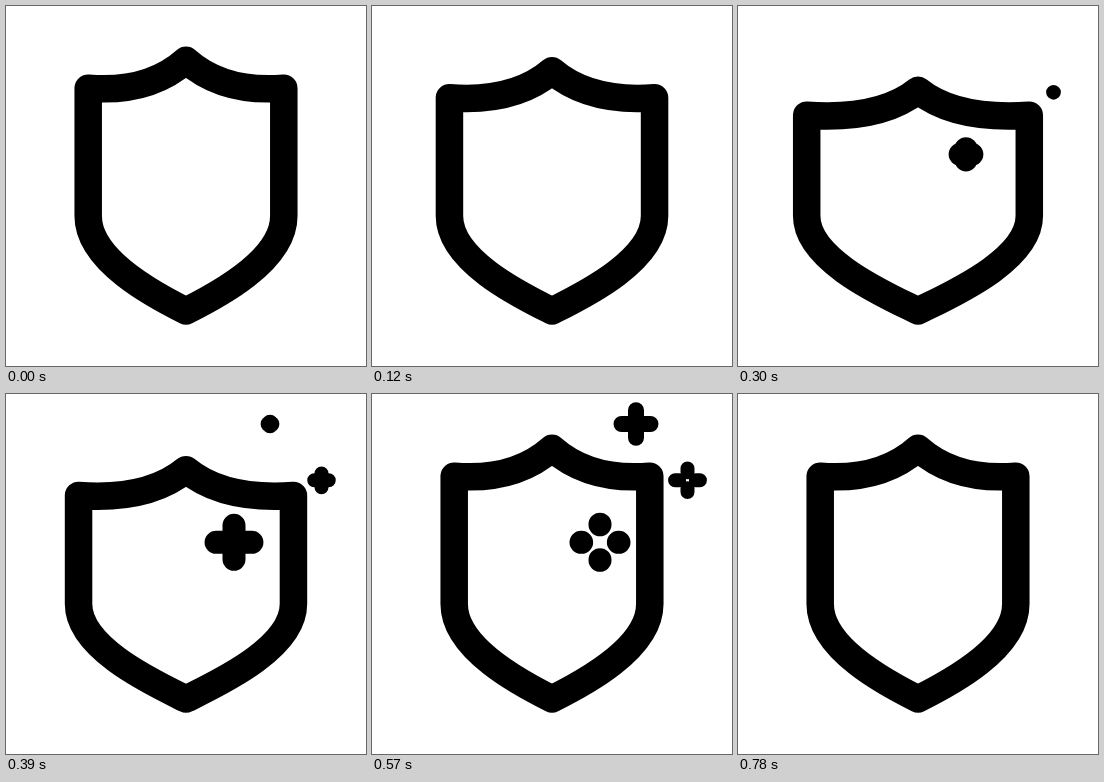
An HTML page that plays this animation: 360 px wide and 360 px high, repeating every 1050 ms.

```html
<!DOCTYPE html>
<html lang="en">
<head>
<meta charset="utf-8">
<title>Shield</title>
<style>
  html, body { margin: 0; height: 100%; overflow: hidden; background: #fff; }
  svg { display: block; width: 100%; height: 100%; }
  path { fill: none; stroke: #000; stroke-linecap: round; stroke-linejoin: round; }
</style>
</head>
<body>
<svg viewBox="0 0 360 360">
  <path id="shield" stroke-width="27.5"/>
</svg>
<script>
const LOOP = 1050, STEP = 30, GROW = 270, TRAIL = 170;
const ARMS = [[1, 0], [-1, 0], [0, .95], [0, -.95]];
const svg = document.querySelector('svg');
const shield = document.getElementById('shield');

const unit = (t, from, to) => Math.min(1, Math.max(0, (t - from) / (to - from)));
const smooth = u => u * u * (3 - 2 * u);
const cubic = u => u < .5 ? 4 * u ** 3 : 1 - 4 * (1 - u) ** 3;

const sparkles = [
  { x: 228, y: 148.3, reach: 19, width: 23, start: 185 },
  { x: 315.5, y: 86.3, reach: 12.4, width: 14, start: 247 },
  { x: 264, y: 30, reach: 14.5, width: 16, start: 312 }
].map(s => {
  s.path = document.createElementNS('http://www.w3.org/2000/svg', 'path');
  s.path.setAttribute('stroke-width', s.width);
  svg.append(s.path);
  return s;
});

function drawShield(t) {
  const squash = smooth(unit(t, 0, 300)) - smooth(unit(t, 300, 555));
  const left = 82.2 - 13.5 * squash, right = 360 - left;
  const top = 82.2 + 27 * squash, peak = 54.2 + 30 * squash;
  shield.setAttribute('d', `M180 ${peak} Q143 ${top + 5} ${left} ${top} V210
    C${left} 255 150 290 180 305 C210 290 ${right} 255 ${right} 210
    V${top} Q217 ${top + 5} 180 ${peak}Z`);
}

// Four arms grow out of the centre, then their inner ends follow.
function drawSparkle({ x, y, reach, start, path }, t) {
  const outer = cubic(unit(t, start, start + GROW));
  const inner = cubic(unit(t, start + TRAIL, start + TRAIL + GROW));
  const a = reach * inner, b = reach * outer;
  path.setAttribute('d', b <= a ? '' : ARMS
    .map(([i, j]) => `M${x + i * a} ${y + j * a}L${x + i * b} ${y + j * b}`).join(''));
}

function draw(now) {
  const t = Math.floor(now % LOOP / STEP) * STEP;
  drawShield(t);
  sparkles.forEach(s => drawSparkle(s, t));
}

function tick() {
  draw(performance.now());
  requestAnimationFrame(tick);
}
tick();
</script>
</body>
</html>
```
